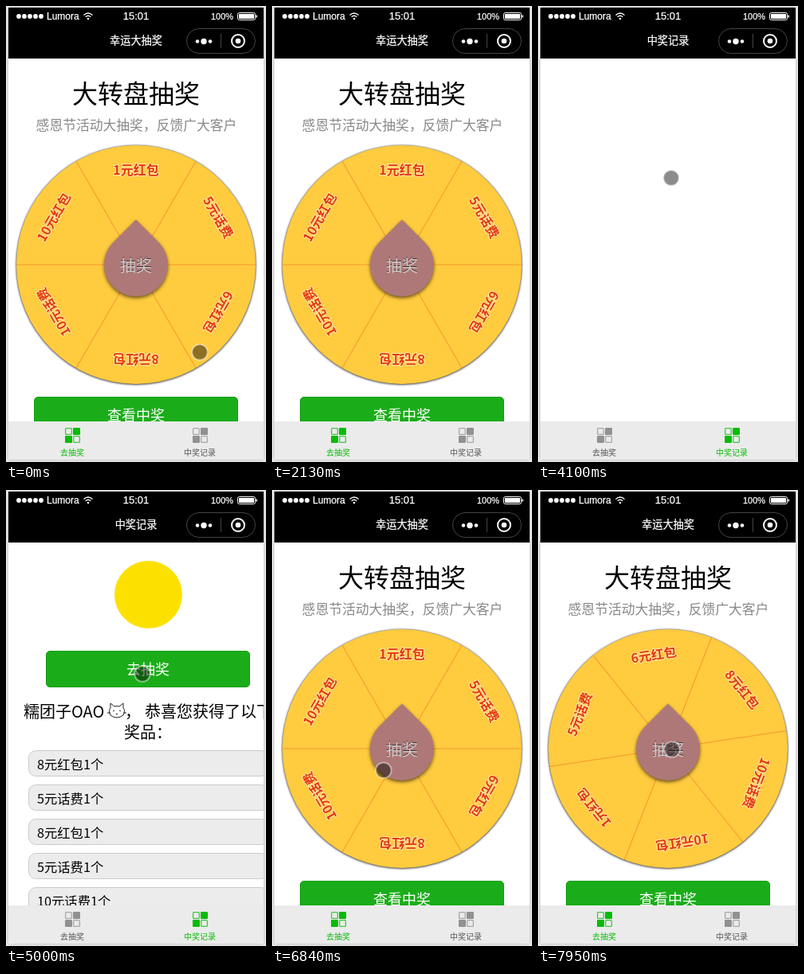
Animation of 326x573 px, one loop 8 s. Source, as an HTML page:

```html
<!DOCTYPE html>
<html lang="zh">
<head>
<meta charset="utf-8">
<title>幸运大抽奖</title>
<style>
html, body { margin: 0; width: 100%; height: 100%; overflow: hidden; background: #eee; }
svg { display: block; width: 326px; height: 573px; font-family: "Noto Sans CJK SC", "Noto Sans CJK", sans-serif; }
.latin { font-family: "Liberation Sans", Arial, sans-serif; }
.latin, #title { stroke: #fff; stroke-width: .25px; }
.mid { font-family: "Noto Sans CJK TC", "Noto Sans CJK", sans-serif; }
.phone { filter: drop-shadow(0 0 2px #0004); }
.rim { filter: drop-shadow(0 0 .8px #0009) drop-shadow(0 1px 1px #333a); }
.pin { filter: drop-shadow(0 2px 2px #0009); }
.raised { filter: drop-shadow(0 -1px .5px #0009); }
.label { font-weight: bold; paint-order: stroke; stroke: #fff8; stroke-width: 2px; }
.hide { display: none; }
</style>
</head>
<body>
<svg id="stage" viewBox="0 0 326 573"></svg>
<script>
const LOOP = 8000, CX = 163, CY = 325;
const prizes = ['1元红包', '5元话费', '6元红包', '8元红包', '10元话费', '10元红包'];
const won = ['8元红包', '5元话费', '8元红包', '5元话费', '10元话费'];

// y is the visual middle of the line
const text = (x, y, size, str, fill = '#000', anchor = 'middle', extra = '') =>
  `<text x="${x}" y="${y + size * .37}" font-size="${size}" fill="${fill}" text-anchor="${anchor}" ${extra}>${str}</text>`;
const dot = (x, y, r, fill = '#fff') => `<circle cx="${x}" cy="${y}" r="${r}" fill="${fill}"/>`;
const mid = str => `<tspan class="mid">${str}</tspan>`;
const button = (x, y, str) =>
  `<rect x="${x + .5}" y="${y + .5}" width="255" height="45" rx="4.5" fill="#1aad19" stroke="#189c17"/>`
  + text(x + 128, y + 23.5, 18, str, '#fff');

const wheel = prizes.map((p, i) => `<g transform="rotate(${i * 60} ${CX} ${CY})">
  <path d="M${CX} ${CY}v-150" transform="rotate(30 ${CX} ${CY})" stroke="#e4370e" stroke-opacity=".35"/>
  ${text(CX, 206, 16, p, '#e4370e', 'middle', 'class="label"')}</g>`).join('');

const list = won.map((p, i) => `<rect x="28.5" y="${327.5 + i * 43}" width="300" height="32" rx="9" fill="#ececec" stroke="#ccc"/>`
  + text(39, 344.5 + i * 43, 16.3, p + '1个', '#000', 'start')).join('');

const tab = (id, x, str) => `<g id="${id}">
  <g fill="currentColor"><rect x="${x + 1}" y="530" width="9" height="9" rx="1"/><rect x="${x - 9}" y="540" width="9" height="9" rx="1"/></g>
  <g fill="none" stroke="currentColor" stroke-width="1.3" opacity=".75"><rect x="${x - 8.4}" y="530.7" width="7.7" height="7.7" rx="1"/><rect x="${x + 1.7}" y="540.7" width="7.7" height="7.7" rx="1"/></g>
  ${text(x, 561.5, 10, str, 'var(--ink)')}</g>`;

stage.innerHTML = `
<clipPath id="screen"><rect x="3" y="2" width="320" height="568"/></clipPath>
<rect class="phone" x="3" y="2" width="320" height="568" fill="#fff"/>
<g clip-path="url(#screen)">
  <g id="draw">
    ${text(CX, 110.5, 32, '大转盘抽奖')}
    ${text(CX + .5, 149.5, 16.8, `感恩节活动大抽奖${mid('，')}反馈广大客户`, '#888')}
    <circle class="rim" cx="${CX}" cy="${CY}" r="150" fill="#ffcb3f"/>
    <g id="wheel">${wheel}</g>
    <path class="pin" d="M163 268.5l28.3 28.3a40 40 0 1 1-56.6 0z" fill="#ae7878"/>
    ${text(CX, 326.5, 20, '抽奖', '#d2cccc', 'middle', 'class="raised"')}
    ${button(35, 491, '查看中奖')}
  </g>
  <g id="record">
    ${dot(178.5, 131.5, 42.5, '#fce100')}
    ${button(50, 202, '去抽奖')}
    ${text(22, 279, 20, '糯团子OAO', '#000', 'start')}
    <path d="M131 283Q128 277 131 274L131 268 136 272Q139 271 142 272L147 268 147 274Q150 277 147 283Q139 289 131 283zM134 278l2-1M142 277l2 1M138 281l1 1 1-1M127 280h4M147 280h4" fill="none" stroke="#222"/>
    ${text(149, 279, 20, '，', '#000', 'start')}
    ${text(174, 279, 20, '恭喜您获得了以下', '#000', 'start')}
    ${text(178, 305, 20, `奖品${mid('：')}`)}
    ${list}
  </g>
  <rect x="3" y="522" width="320" height="48" fill="#ebebeb"/>
  ${tab('tabDraw', 83, '去抽奖')}${tab('tabRecord', 243, '中奖记录')}
  <rect x="3" y="2" width="320" height="64"/>
  ${[16, 23, 30, 37, 44].map(x => dot(x, 13, 2.9)).join('')}
  <g class="latin">
    ${text(51, 12.2, 12, 'Lumora', '#fff', 'start')}
    ${text(163, 12, 13, '15:01', '#fff')}
    ${text(257, 12.5, 11, '100%', '#fff', 'start')}
  </g>
  <path d="M97.5 11.5q5.5-5 11 0M99.7 13.8q3.3-3 6.6 0" fill="none" stroke="#fff" stroke-width="1.3"/>
  ${dot(103, 16, 1.3)}
  <rect x="290.5" y="8.5" width="22" height="9" rx="2" fill="none" stroke="#fff"/>
  <path d="M292 10h19v6h-19zM313.5 11.5h1.5v3h-1.5z" fill="#fff"/>
  <text id="title" x="163" y="48" font-size="13.2" fill="#fff" text-anchor="middle"></text>
  <rect x="226.5" y="28.5" width="86" height="31" rx="15.5" fill="none" stroke="#444"/>
  <path d="M269.5 35v18" stroke="#444"/>
  ${dot(240, 44.5, 2.3)}${dot(248, 44.5, 3.7)}${dot(256, 44.5, 2.3)}${dot(291, 44, 3.3)}
  <circle cx="291" cy="44" r="8" fill="none" stroke="#fff" stroke-width="2"/>
</g>
<circle id="cursor" r="9.8" fill="#000" fill-opacity=".45" stroke="#fff" stroke-opacity=".45" stroke-width="2"/>`;

const $ = id => document.getElementById(id);

// start, end, steps, target x, target y
const moves = [
  [70, 120, 2, 269, 427], [490, 670, 4, 203.5, 305], [850, 960, 3, 159, 335],
  [1460, 1580, 3, 215, 406], [2070, 2071, 1, 214, 401],
  [3750, 3751, 1, 243, 553], [3890, 4100, 4, 167, 216], [4530, 4820, 6, 166, 218],
  [5000, 5001, 1, 171, 231], [5060, 5061, 1, 173, 240], [5250, 5950, 12, 94, 558],
  [6260, 6435, 4, 87, 519], [6495, 7020, 10, 175, 241], [7080, 7190, 3, 168, 326]
];

function cursorAt(t) {
  let x = 243, y = 435;
  for (const [start, end, n, tx, ty] of moves) {
    if (t < start) break;
    const gap = (end - start) / (n - 1 || 1);
    const k = Math.min(n, Math.floor((t - start) / gap + .01) + 1) / n;
    x += (tx - x) * k;
    y += (ty - y) * k;
  }
  return [x, y];
}

function angleAt(t) {
  if (t < 7430) return 0;
  const step = Math.min(9, Math.floor((t - 7424) / 57.8));
  return 71.5 * ((step + .26) / 2.26) ** 1.498;
}

const show = (id, on) => $(id).classList.toggle('hide', !on);

function paintTab(id, active) {
  $(id).style.color = active ? '#09bb07' : '#919193';
  $(id).style.setProperty('--ink', active ? '#09bb07' : '#555');
}

function render(t) {
  const onRecord = t >= 3820 && t < 6377;
  $('title').textContent = onRecord ? '中奖记录' : '幸运大抽奖';
  paintTab('tabDraw', !onRecord);
  paintTab('tabRecord', onRecord);
  show('draw', t < 3890 || t >= 6500);
  show('record', t >= 4530 && t < 6500);
  $('wheel').setAttribute('transform', `rotate(${angleAt(t)} ${CX} ${CY})`);
  show('cursor', t < 2130 || t >= 3750);
  $('cursor').setAttribute('transform', `translate(${cursorAt(t)})`);
}

const begin = performance.now();
function tick() {
  render((performance.now() - begin) % LOOP);
  requestAnimationFrame(tick);
}
tick();
</script>
</body>
</html>
```
